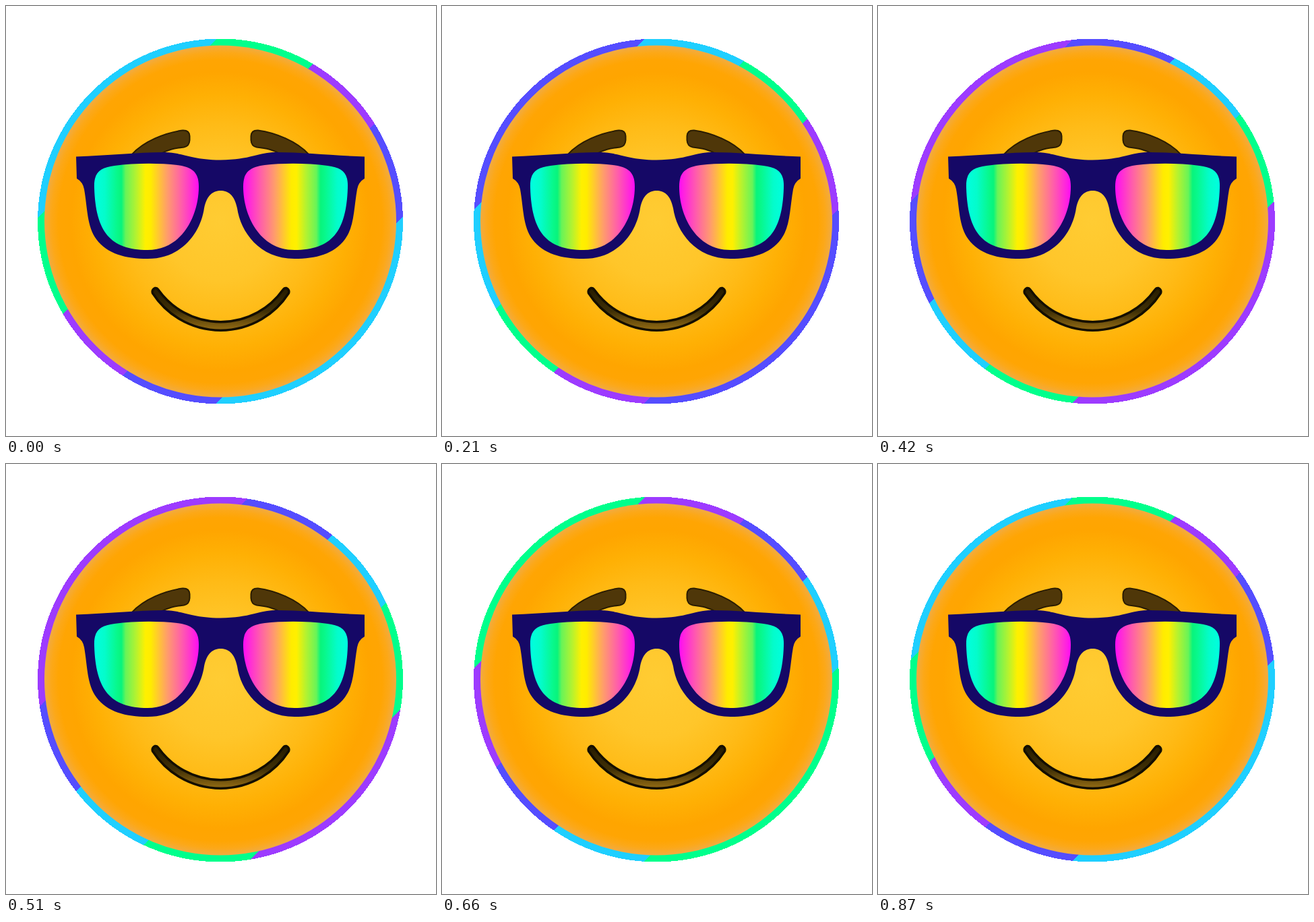
Recreate the animation shown at these times as an HTML page. Size 638 by 638 pixels, loop 0.9 s.

```html
<!DOCTYPE html>
<html lang="en">
<head>
<meta charset="utf-8">
<title>Cool face</title>
<style>
  html, body { margin: 0; width: 100%; height: 100%; overflow: hidden; background: #fff; }
  svg { display: block; width: 100vw; height: 100vh; }
</style>
</head>
<body>
<svg viewBox="0 0 638 638">
  <defs>
    <linearGradient id="stripes" gradientUnits="userSpaceOnUse" spreadMethod="repeat"
                    x1="181" y1="181" x2="541" y2="541"></linearGradient>
    <radialGradient id="skin" gradientUnits="userSpaceOnUse" cx="318" cy="319.5" r="261">
      <stop offset="0" stop-color="#ffcc33"/>
      <stop offset=".33" stop-color="#ffc62a"/>
      <stop offset=".55" stop-color="#ffbb17"/>
      <stop offset=".72" stop-color="#ffb004"/>
      <stop offset=".85" stop-color="#ffa500"/>
      <stop offset=".92" stop-color="#ffa503"/>
      <stop offset=".96" stop-color="#fca818"/>
      <stop offset="1" stop-color="#f2ab40"/>
    </radialGradient>
    <linearGradient id="rainbow" gradientUnits="userSpaceOnUse" x1="131" y1="0" x2="286" y2="0">
      <stop offset="0" stop-color="#00ffe0"/>
      <stop offset=".1" stop-color="#04fccb"/>
      <stop offset=".22" stop-color="#08f88a"/>
      <stop offset=".26" stop-color="#08f47c"/>
      <stop offset=".3" stop-color="#68f458"/>
      <stop offset=".4" stop-color="#b4f230"/>
      <stop offset=".49" stop-color="#fff000"/>
      <stop offset=".54" stop-color="#ffec00"/>
      <stop offset=".7" stop-color="#ff9c6c"/>
      <stop offset=".84" stop-color="#ff5cac"/>
      <stop offset="1" stop-color="#ff0cf4"/>
    </linearGradient>
    <linearGradient id="lip" x1="0" y1="0" x2="0" y2="1">
      <stop offset="0" stop-color="#261c00"/>
      <stop offset=".55" stop-color="#403006"/>
      <stop offset="1" stop-color="#946c14"/>
    </linearGradient>
    <path id="brow" d="M187 220C204 201 236 188 262 184.500Q272 184 272.500 193L272.500 199Q272 208 264 209.500C250 211 240 213 226 221Z"
          fill="#4f3709" stroke="#2a1c02" stroke-width="2"/>
    <path id="lens" d="M131 270C130 247 139 240 161 237C190 233 228 233 254 236C278 239 286 248 286 268C286 310 262 362 210 362C155 362 133 335 131 270Z"
          fill="url(#rainbow)"/>
  </defs>

  <circle cx="318" cy="319.500" r="271" fill="url(#stripes)" shape-rendering="crispEdges"/>
  <circle cx="318" cy="319.500" r="261" fill="url(#skin)"/>

  <use href="#brow"/>
  <use href="#brow" transform="matrix(-1 0 0 1 636 0)"/>

  <path fill="#150866" d="M104 223.500C150 222 195 217 235 217C262 217 272 228 318 228.500C364 228 374 217 401 217C441 217 486 222 532 223.500L532 256Q523 261 521 272C516 300 517 327 503 346C487 368 460 375 428 375C376 375 348 335 343 300C339 280 329 274 318.500 274C308 274 298 280 294 300C289 335 262 375 210 375C178 375 150 368 134 346C120 327 121 300 116 272Q114 261 105 256Z"/>
  <use href="#lens"/>
  <use href="#lens" transform="matrix(-1 0 0 1 638 0)"/>

  <path d="M217.500 426A120 120 0 0 0 419.500 426Q421 421 416 418.500Q413 418 411 421A113.500 113.500 0 0 1 226 421Q224 418 221 418.500Q216 421 217.500 426Z"
        fill="url(#lip)" stroke="#140e00" stroke-width="3.500" stroke-linejoin="round"/>
</svg>
<script>
  const LOOP = 900, STEP = 30, PERIOD = 360;
  const stripes = document.getElementById('stripes');
  const colors = ['#00ff8c', '#9d3bff', '#554dff', '#1fcfff'];

  // Two stops per band keep the colour edges hard.
  stripes.innerHTML = colors.map((c, i) =>
    [i, i + 1].map(n => `<stop offset="${n / colors.length}" stop-color="${c}"/>`).join('')
  ).join('');

  const start = performance.now();
  function draw() {
    const t = Math.max(0, performance.now() - start) % LOOP;
    const shift = Math.floor(t / STEP) * STEP / LOOP * PERIOD;
    stripes.setAttribute('gradientTransform', `translate(${shift} ${shift})`);
    requestAnimationFrame(draw);
  }
  draw();
</script>
</body>
</html>
```
